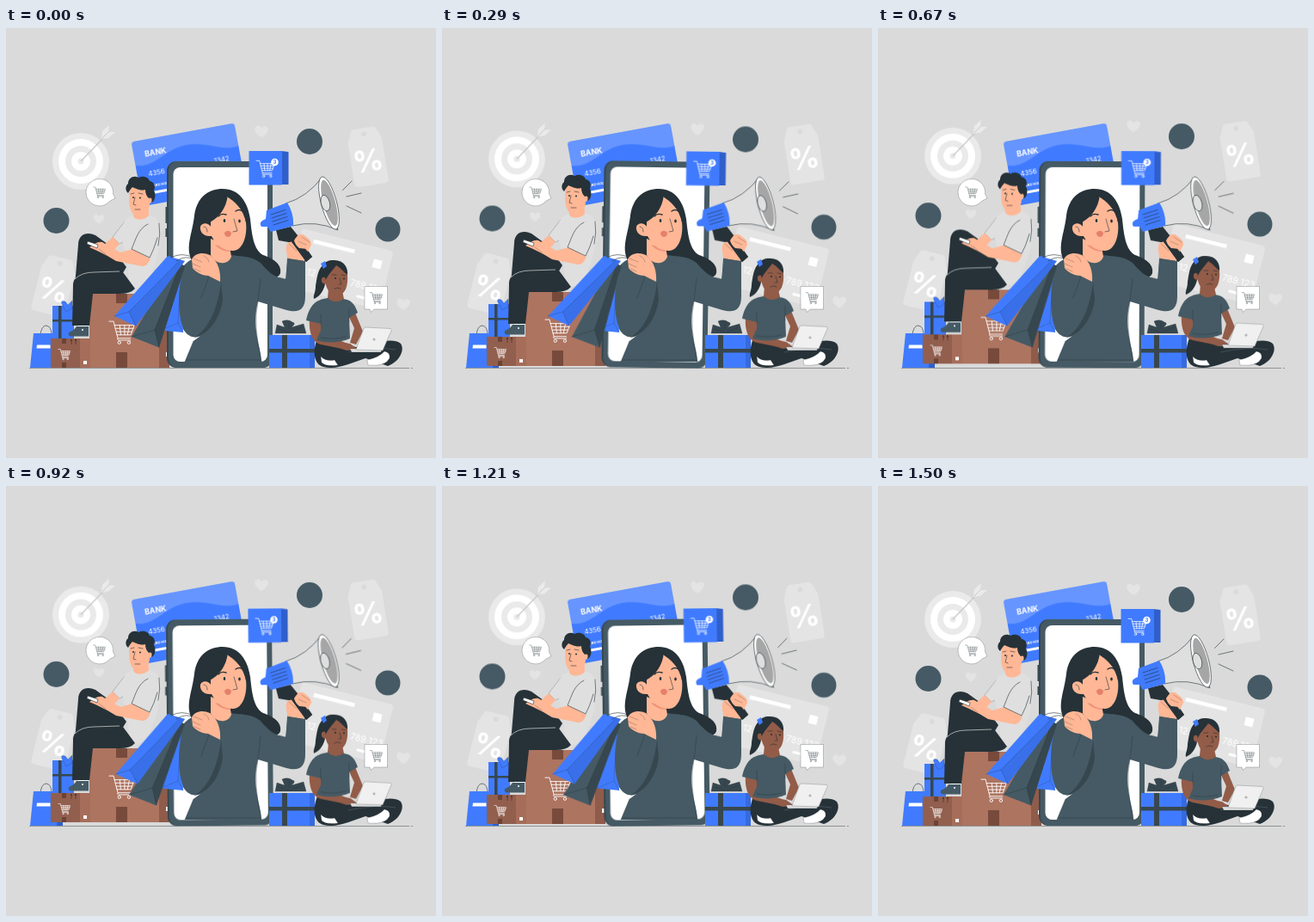
These frames come from a looping animation (500x500 px, 1540 ms). An HTML page:

```html
<!DOCTYPE html>
<html lang="en">
<head>
<meta charset="utf-8">
<title>Online shopping</title>
<style>
html, body { margin: 0; width: 100%; height: 100%; overflow: hidden; background: #dadada; }
svg { display: block; width: 100%; height: 100%; font-family: Inter, Roboto, sans-serif; }

/* 1500 ms of linear motion, then a 40 ms rest */
.bob, .sway, .lean { animation: 1540ms linear infinite; }
.bob { animation-name: bob; --d: -6.600px; }
.sway { animation-name: sway; --a: 1deg; }
.lean { animation-name: lean; transform-origin: 0 268px; }
@keyframes bob {
  0%, 97.4%, 100% { transform: translateY(0); }
  48.7% { transform: translateY(var(--d)); }
}
@keyframes sway {
  0%, 97.4%, 100% { transform: rotate(0deg); }
  24.35% { transform: rotate(var(--a)); }
  73.05% { transform: rotate(calc(-1 * var(--a))); }
}
@keyframes lean {
  0%, 97.4%, 100% { transform: skewX(0deg); }
  24.35% { transform: skewX(var(--a)); }
  73.05% { transform: skewX(calc(-1 * var(--a))); }
}

.ink { fill: #263238; }
.slate { fill: #455a64; }
.deep { fill: #37474f; }
.blue { fill: #407bff; }
.navy { fill: #2f5fcb; }
.skin { fill: #ffb795; }
.brown { fill: #925c48; }
.white { fill: #fff; }
.pale { fill: #dfdfdf; }
.disc { fill: #eaeaea; }
.tag { fill: #e4e4e4; }
.line { fill: none; stroke: #263238; stroke-width: .6; stroke-linecap: round; stroke-linejoin: round; }
.lineW { fill: none; stroke: #fff; stroke-linecap: round; stroke-linejoin: round; }
.edge { stroke: #263238; stroke-width: .6; stroke-linejoin: round; }
.brow { stroke-width: 1.400; }
</style>
</head>
<body>
<svg viewBox="0 0 500 500">
<defs>
  <path id="cart" d="M0 1H4.500L9 18.500H22M5.500 5H26L22.500 15H8M6.300 8.300H25M7.200 11.700H23.700M11 5L12 15M16 5V15M21 5L19 15M9 18.500Q7.500 20 9.500 20.500H22M12 23a1.500 1.500 0 1 1-3 0a1.500 1.500 0 1 1 3 0M22 23a1.500 1.500 0 1 1-3 0a1.500 1.500 0 1 1 3 0"/>
  <path id="heart" d="M0 7C-5 4-8.500 0-7.500-4C-6-8-1.500-7 0-3.500C2-7 7-7 8-3C8 1 4 5 0 7Z"/>
  <path id="tag" d="M-11-38H11Q14-38 15-35L20-23V25Q20 29 16 29H-16Q-20 29-20 25V-23L-15-35Q-14-38-11-38ZM0-34a3 3 0 1 0 .1 0Z"/>
</defs>

<!-- backdrop -->
<g class="bob" style="--d:-7px">
  <circle class="disc" cx="87" cy="155" r="33"/>
  <circle class="white" cx="87" cy="155" r="26"/>
  <circle class="disc" cx="87" cy="155" r="18"/>
  <circle class="white" cx="87" cy="155" r="11"/>
  <circle class="disc" cx="87" cy="155" r="3.500"/>
  <path d="M87 155L115 126" stroke="#c8c8c8" stroke-width="1.200"/>
  <path class="disc" d="M111 129L112 120L120 113L119 121L127 121L119 128Z"/>
  <path d="M112 128L120 120" stroke="#c8c8c8"/>
</g>
<g class="bob tag">
  <use href="#heart" x="297" y="120"/>
  <use href="#heart" x="462" y="321"/>
  <use href="#heart" transform="translate(108 222) scale(.8)"/>
</g>
<g class="bob" style="--d:-7.500px">
  <g transform="translate(421 154) rotate(-9)">
    <use href="#tag" class="tag" fill-rule="evenodd"/>
    <text class="white" y="13" font-size="35" font-weight="700" text-anchor="middle">%</text>
  </g>
</g>
<g class="bob">
  <g transform="translate(55 304) rotate(14)">
    <use href="#tag" class="tag" fill-rule="evenodd"/>
    <text class="white" y="13" font-size="35" font-weight="700" text-anchor="middle">%</text>
  </g>
</g>
<g class="bob">
  <g transform="translate(344 233) rotate(14)">
    <rect class="tag" width="110" height="70" rx="4"/>
    <rect class="white" x="17" y="9" width="49" height="4.500"/>
    <rect class="white" x="90" y="14" width="10" height="10" rx="1"/>
    <text class="white" x="18" y="51" font-size="10.500">12</text>
    <text class="white" x="70" y="51" font-size="10.500">789 123</text>
    <path class="lineW" d="M82 61H100" stroke-width="3"/>
  </g>
</g>

<!-- bank card -->
<g transform="translate(145.500 132.500) rotate(-10.400)">
  <rect class="blue" width="122" height="76" rx="4"/>
  <path d="M0 28C20 34 32 20 52 16C82 10 100 31 122 27V4Q122 0 118 0H4Q0 0 0 4Z" fill="#fff" opacity=".2"/>
  <g class="white">
    <text x="13" y="19.500" font-size="8.800" font-weight="700">BANK</text>
    <text x="13" y="42.500" font-size="7.800">4356</text>
    <text x="91" y="41.500" font-size="7.800">1342</text>
    <text x="13" y="56" font-size="4" font-weight="700">CARD HOLDER</text>
    <rect x="13" y="61" width="35" height="3"/>
  </g>
</g>

<!-- social badges -->
<g class="bob slate">
  <circle cx="58.500" cy="224" r="15"/>
  <circle cx="353" cy="132" r="15"/>
  <circle cx="444" cy="234" r="14.500"/>
</g>

<path d="M27 395.500H469M471 395.500H473" stroke="#6d7478" stroke-width=".7"/>

<!-- left bag -->
<path class="line" d="M40 357Q41 346 47 346Q53 347 53 357"/>
<path class="blue" d="M32 355H66V395H28Z"/>
<path class="navy" d="M63 355H66V395H59Z"/>
<path class="white" d="M36 368.500H51.500V372.500H35.500Z"/>

<!-- gift, boxes and seated man -->
<g class="bob" style="--d:-5.200px">
  <path class="blue" d="M54 323H79V395H54Z"/>
  <path class="deep" d="M61 323H64.500V395H61ZM54 339H79V341.500H54Z"/>
  <path class="blue edge" stroke-opacity=".4" d="M66 323Q62 316 69 318L72 322L77 317V326L70 330Z"/>

  <path d="M97 309H190V395H97Z" fill="#ad7460"/>
  <path d="M178 309H190V395H178Z" fill="#8f5c4b"/>
  <path d="M128 309H141V320H128ZM128 377H141V395H128Z" fill="#784a3b"/>
  <use href="#cart" class="lineW" transform="translate(120 340) scale(1.120)" stroke-width=".8"/>
  <rect class="white" x="186" y="377" width="4" height="5"/>

  <path d="M52 361H98V395H52Z" fill="#925f4e"/>
  <path d="M86 361H98V395H86Z" fill="#a66d5a"/>
  <path d="M65 361H70V367H65ZM65 389H70V395H65Z" fill="#6c4336"/>
  <path d="M76 368V362M75 364L76 362L77 364M81 368V362M80 364L81 362L82 364" fill="none" stroke="#4b2d24" stroke-width=".7"/>
  <use href="#cart" class="lineW" transform="translate(61 373) scale(.52)" stroke-width="1.200"/>
  <rect class="white" x="90" y="387" width="4" height="4"/>

  <path class="ink" d="M84 252C84 240 94 236 104 241L122 254L140 278L134 288L100 290L80 300Z"/>
  <path class="pale edge" stroke-opacity=".4" d="M138 225L124 243L132 251L145 244Z"/>
  <path class="skin" d="M124 243L112 254L122 262L132 251Z"/>
  <path class="pale" d="M148 218C136 221 133 232 136 249L141 270C143 283 140 294 148 303C158 305 166 297 170 283C178 265 183 238 178 226C174 219 168 218 165 217Z"/>
  <path class="skin" d="M147 205L148 219C151 225 162 223 166 218L165 200Z"/>
  <path class="ink" d="M78 300C78 288 88 284 100 284H136L150 303Q145 309 132 309H101L97 346H77Z"/>
  <path d="M80 292Q88 284 102 284L132 283" fill="none" stroke="#dadada" stroke-width=".7"/>
  <path class="white" d="M84 346H96V349H83Z"/>
  <path class="slate" d="M82 347Q79 352 73 354Q72 358 75 358.500H96V347Z"/>
  <circle class="white" cx="89" cy="351" r="1"/>
  <path class="skin" d="M147 257L133 261L112 249C106 248 102 252 97 255L106 259L118 265L128 271L158 277Q164 278 168 268Z"/>
  <path class="white edge" d="M95 248L107 252L106 256L94 251Z"/>
  <path class="pale" d="M164 225C153 232 150 246 146 257L167 267C175 252 181 238 178 226Z"/>
  <path class="line" d="M165 228C153 234 151 246 146 257L167 267Q172 258 176 244M178 227Q180 240 177 253"/>
  <path class="line" d="M108 257L116 263" stroke-opacity=".5"/>
  <path class="skin" d="M144 187C142 202 143 218 154 218.500C162 219 167 211 167 204Q174 201 172 196L166 186L148 183Z"/>
  <path class="ink" d="M142 192C138 189 139 183 142 181C142 174 149 171 154 174C160 171 166 174 167 178C173 179 174 185 172 189C175 194 173 202 169 203Q171 196 166 198Q162 194 162 188C156 190 150 186 147 185Q144 188 142 192Z"/>
  <path class="line" d="M145 193L149 192M154 192L159 193M150 197L148 205L151 206M150 211L156 211" stroke-width="1"/>
  <circle class="ink" cx="148" cy="197" r="1"/><circle class="ink" cx="156" cy="197.500" r="1"/>
</g>

<!-- speech bubble -->
<path class="white edge" d="M109 175.500A15.700 15.700 0 1 0 121 201L127 198L124.500 193A15.700 15.700 0 0 0 109 175.500Z" stroke-opacity=".45"/>
<use href="#cart" class="line" transform="translate(101.500 184.500) scale(.54)"/>

<!-- phone and cart cube -->
<g class="sway" style="transform-origin:248px 275px">
  <path class="deep" d="M188 208H185.500V227H188ZM188 233H185.500V243H188Z"/>
  <rect class="deep" x="187" y="155" width="122" height="240" rx="11"/>
  <rect class="slate" x="189" y="155" width="121" height="240" rx="11"/>
  <rect class="white" x="194.500" y="162" width="109.500" height="226" rx="8"/>
  <path class="navy" d="M320 143L328.500 144V182H320Z"/>
  <path class="blue" d="M282.500 143H321V182.500H282.500Z"/>
  <use href="#cart" class="lineW" transform="translate(291 153.500) scale(.82)" stroke-width=".9"/>
  <circle class="white" cx="312.500" cy="156" r="4.300"/>
  <text class="blue" x="312.500" y="158.300" font-size="6" font-weight="700" text-anchor="middle">3</text>
</g>

<!-- gift on the right -->
<path class="blue" d="M306 357H359V395H306Z"/>
<path class="navy" d="M353 357H359V395H353Z" opacity=".6"/>
<path class="deep" d="M321 357H327V395H321ZM306 373H359V377.500H306Z"/>
<path class="deep edge" stroke-opacity=".5" d="M329 355L313 355L315 345L324 348L321 341Q328 338 333 342Q338 343 332 348L346 344L349 355Z"/>
<path class="line" d="M329 354L317 350M331 354L344 348M329 350V343" stroke-opacity=".6"/>

<!-- woman with megaphone -->
<path class="ink" d="M216 270C208 255 217 238 219 218C222 196 236 187 252 187C271 187 281 202 284 222C286 241 288 258 299 264C311 268 321 275 319 285C317 292 307 291 302 288C280 292 245 284 216 270Z"/>
<path class="slate" d="M240 264C222 264 208 270 202 284C196 300 196 325 204 346C209 358 218 362 226 358L218 364L208 388H297C297 372 285 350 293 318L326 328C341 332 348 327 348 312V270L328 264L325 292C312 290 305 284 296 273C284 264 270 266 262 264Z"/>
<path class="line" d="M218 364L208 388M296 291L293 318Q287 345 297 388M325 292L318 290M210 386H296" stroke-opacity=".6"/>
<path class="skin" d="M238 245L238 264C244 276 258 276 262 266L260 254Z"/>
<path d="M243 252Q250 260 261 260V256Z" fill="#ef9279"/>
<path class="skin" d="M238 222C247 217 254 208 257 196C266 202 277 211 279 226C281 244 274 259 264 259C252 259 244 252 239 242C230 243 225 237 226 231C228 226 235 226 238 231Z"/>
<path class="ink" d="M258 194C256 210 248 220 237 226L234 214L246 196ZM256 195C266 199 276 211 279 226L283 224C281 207 273 197 264 192Z"/>
<path class="line" d="M265 222L269 236L264 237M230 231Q234 231 234 237" stroke-width=".9"/>
<path class="line brow" d="M247 219Q250 215 256 217M267 213Q271 210 275 213"/>
<ellipse class="ink" cx="254" cy="224" rx="1.300" ry="1.900"/>
<ellipse class="ink" cx="271.500" cy="224.500" rx="1.300" ry="1.900"/>
<path d="M254 238Q258 233.500 262 238Q262 243 257.500 243Q254 242 254 238Z" fill="#e5806b"/>

<!-- shopping bags -->
<path class="blue" d="M203 274L206 354L180 351.500L188 300Z"/>
<path class="line" d="M203 290L200 343L206 354M200 343L181 351" stroke-opacity=".4"/>
<g class="lean" style="--a:4deg">
  <path class="slate" d="M198 271L208 277L178 371.500L146 359Z"/>
  <path class="deep" d="M203 274L208 277L178 371.500L173 351Z"/>
  <path class="line" d="M203 274L173 351L146 359M173 351L178 371" stroke-opacity=".6"/>
</g>
<g class="lean" style="--a:-3deg">
  <path class="blue" d="M188 265L208 271L151 346.500L126 335Z"/>
  <path class="navy" d="M203 269.500L208 271L151 346.500L143 330Z" opacity=".4"/>
  <path class="line" d="M203 269.500L143 330L126 335M143 330L151 346" stroke-opacity=".5"/>
</g>
<path class="line" d="M192 267Q204 260 218 267M198 271Q208 263 222 270"/>

<!-- left arm and hand -->
<path class="slate" d="M206 284C199 306 200 335 206 348C211 360 222 361 230 352C240 341 248 322 250 296L236 288L226 315Z"/>
<path class="deep" d="M250 295L252 316C249 338 236 356 219 360C236 350 247 324 250 295Z"/>
<path class="line" d="M236 289L227 314" stroke-opacity=".6"/>
<path class="skin" d="M216 269C219 262 229 260 237 264C245 270 250 280 249 295L235 288C228 288 219 283 217 279Z"/>
<path class="line" d="M218 268L228 272M217 274L226 278M219 280L226 283M230 265Q235 267 236 272" stroke-opacity=".45"/>

<!-- megaphone -->
<g class="sway" style="transform-origin:340px 255px">
  <path class="ink" d="M314 235L331 231L343 246L356 266L349 272L334 250L317 247Z"/>
  <path class="pale edge" d="M325 204Q350 197 368 173L386 235Q360 223 333 230Z"/>
  <path class="blue" d="M303 212L327 203Q335 216 334 230L308 237L304 231L297 231Q294 227 298 224L302 222Z"/>
  <path class="line" d="M308 217L325 211.500M309 221L326 215.500M310 225L327 219.500M311 229L328 223.500" stroke-width="1"/>
  <g transform="translate(375.500 203.500) rotate(-15)">
    <ellipse class="white edge" rx="9" ry="31.500"/>
    <ellipse cx=".5" rx="7" ry="27.500" fill="#a6a6a6"/>
    <ellipse class="pale edge" cx="-4" cy="-1" rx="5" ry="9.500"/>
  </g>
  <path class="line" d="M391.500 188.500L402 178M396 196L413 192M396 207L413 215"/>
</g>
<path class="skin" d="M327 250L336 247L340 240Q347 240 353 246Q356 251 352 258L347 271L328 268Q324 257 327 250Z"/>
<path class="ink" d="M330 246L338 245L356 266L349 272Z"/>
<path class="skin" d="M335 247Q341 237 347 241L354 248Q357 253 351 257L341 256Q336 252 335 247Z"/>
<path class="line" d="M340 248L349 252M344 243L353 249M329 251L338 259" stroke-opacity=".45"/>
<path class="slate" d="M327 268L347 271L348 285H326Z"/>

<!-- woman with laptop -->
<path class="ink" d="M362 361C356 376 358 391 369 394C386 398 402 389 418 384L444 393C458 388 464 374 459 367C450 360 432 365 419 371C400 374 380 360 362 361Z"/>
<path class="white edge" d="M366 382Q372 388 382 386L386 392Q372 394 367 389Z" stroke-opacity=".4"/>
<path class="white edge" d="M420 386Q434 383 440 376Q447 377 446 384Q441 394 421 392Z" stroke-opacity=".4"/>
<path d="M398 377Q430 370 453 374" fill="none" stroke="#546168" stroke-width=".6"/>
<g class="bob" style="--d:-5.500px">
  <path class="ink" d="M372 274C363 277 362 288 360 300C360 308 357 310 358 315C366 312 373 302 372 285Z"/>
  <path class="brown" d="M353 338C352 352 355 365 366 368L396 374L400 368L372 357L366 339Z"/>
  <path class="brown" d="M398 334L405 349L400 366L407 368L415 353L406 331Z"/>
  <path class="slate" d="M374 314C360 316 353 322 349 340L366 344L366 352L361 363C372 367 389 366 400 361L399 337L409 331C405 319 400 316 392 315Z"/>
  <path class="brown" d="M375 303L374 314Q383 322 393 315L391 306Z"/>
  <path class="brown" d="M371 280C369 295 373 311 385 311C395 310 398 300 397 286Q394 273 382 272Z"/>
  <path class="ink" d="M367 290C363 277 371 269 382 270C393 270 398 279 397 287C392 283 388 278 384 276C379 283 374 287 371 295Z"/>
  <path class="blue" d="M366 274L371 271L373 277L369 280Z"/>
  <path class="brown" d="M371 290Q366 289 367 295Q369 299 373 297Z"/>
  <path class="line" d="M379 287L384 287M390 287L395 288M388 291L390 298L387 298M382 303Q385 301 389 303" stroke-width=".9"/>
  <circle class="ink" cx="383" cy="291" r="1.100"/><circle class="ink" cx="393" cy="291.500" r="1.100"/>
  <path class="line" d="M366 333V345M399 326V342M366 360Q380 363 395 359" stroke-opacity=".6"/>
  <path class="brown" d="M386 365L400 367L410 374L396 375L384 371Z"/>
  <path class="pale edge" d="M400 373H437L436 377H402Z" stroke-opacity=".4"/>
  <path d="M418 348L447 349.500Q449 350 448 352L438 375L407 374L416 349Z" fill="#f0f0f0" stroke="#8b9194" stroke-width=".5"/>
  <circle cx="428" cy="362" r="1.600" fill="#b5b5b5"/>
</g>

<path class="white edge" d="M417 300.500H443.500V327H428L424.500 330.500L423 327H417Z" stroke-opacity=".45"/>
<use href="#cart" class="line" transform="translate(423 307) scale(.56)"/>
</svg>
</body>
</html>
```
